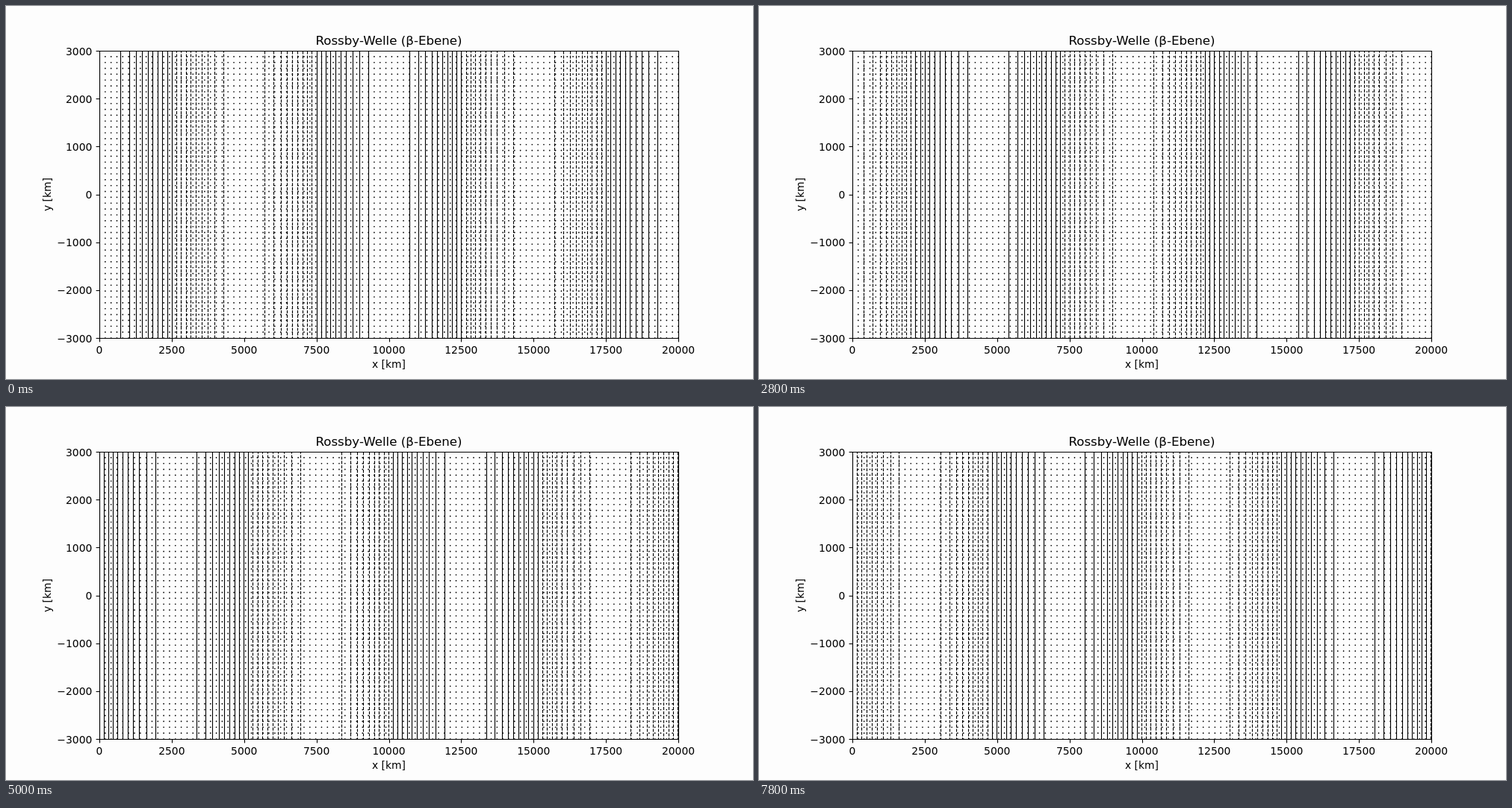
Recreate the animation shown at these times as an HTML page with a canvas. Size 1000 by 500 pixels, loop 8 s.

```html
<!DOCTYPE html>
<html lang="de">
<head>
<meta charset="utf-8">
<title>Rossby-Welle</title>
<style>
  html, body { margin: 0; width: 100%; height: 100%; overflow: hidden; background: #fdfdfd; }
  canvas, svg { position: absolute; left: 0; top: 0; width: 1000px; height: 500px; }
  text { font: 13.889px "DejaVu Sans", sans-serif; text-anchor: middle; }
  .title { font-size: 16.667px; }
  .right { text-anchor: end; }
  path { fill: none; stroke: #000; stroke-width: 1.111; }
</style>
</head>
<body>
<canvas id="plot" width="1000" height="500"></canvas>
<svg id="axes" viewBox="0 0 1000 500">
  <text class="title" x="512.5" y="51.7">Rossby-Welle (β-Ebene)</text>
  <text x="512.5" y="485.3">x [km]</text>
  <text transform="translate(60 252.5) rotate(-90)">y [km]</text>
  <path d="M125.5 60.5H900.5V445.5H125.5Z"/>
</svg>
<script>
const box = { x: 125, y: 60, w: 775, h: 385 };
const nx = 100, ny = 50;
const dx = box.w / (nx - 1), dy = box.h / (ny - 1);

// Physics: phase speed beta / k^2 (westward), one step every six hours
const length = 1e7, domain = 2e7;
const k = 2 * Math.PI / length;
const speed = 2e-11 / (k * k);
const stepSeconds = 6 * 3600, stepMs = 200, steps = 40;

const ctx = document.getElementById('plot').getContext('2d');
const axes = document.getElementById('axes');
const snap = v => Math.floor(v + 0.5) + 0.5;

function add(tag, attrs, text = '') {
  const el = document.createElementNS('http://www.w3.org/2000/svg', tag);
  for (const name in attrs) el.setAttribute(name, attrs[name]);
  el.textContent = text;
  axes.append(el);
}

function drawTicks() {
  for (let i = 0; i <= 8; i++) {
    const x = box.x + box.w * i / 8;
    add('path', { d: `M${snap(x)} 445.5v4.9` });
    add('text', { x, y: 466 }, i * 2500);
  }
  for (let i = -3; i <= 3; i++) {
    const y = box.y + box.h * (3 - i) / 6;
    add('path', { d: `M125.5 ${snap(y)}h-4.9` });
    add('text', { x: 115.3, y: y + 5.6, class: 'right' }, String(i * 1000).replace('-', '\u2212'));
  }
}

// Velocity arrows too short to show: small hexagons on the grid
function makeDots() {
  const path = new Path2D(), r = 0.93;
  for (let i = 0; i < nx; i++) {
    for (let j = 0; j < ny; j++) {
      const x = box.x + i * dx, y = box.y + j * dy;
      path.moveTo(x + r, y);
      for (let a = 1; a < 6; a++) {
        path.lineTo(x + r * Math.cos(a * Math.PI / 3), y + r * Math.sin(a * Math.PI / 3));
      }
      path.closePath();
    }
  }
  return path;
}

function drawContour(x, level, rising) {
  const top = box.y + 0.5, bottom = top + box.h;
  ctx.setLineDash(level < 0 ? [4.111, 1.778] : []);
  ctx.beginPath();
  ctx.moveTo(x, rising ? top : bottom);
  ctx.lineTo(x, rising ? bottom : top);
  ctx.stroke();
}

function draw(step) {
  const shift = speed * stepSeconds * step;
  const psi = i => Math.cos(k * (domain * i / (nx - 1) + shift));
  ctx.clearRect(0, 0, 1000, 500);
  ctx.fill(dots);
  for (let i = 0; i < nx - 1; i++) {
    const a = psi(i), b = psi(i + 1);
    for (let n = -9; n <= 9; n++) {
      const z = n / 10;
      if ((a > z) !== (b > z)) {
        drawContour(snap(box.x + (i + (z - a) / (b - a)) * dx), n, b > a);
      }
    }
  }
}

const dots = makeDots();
let shown = -1;

function tick() {
  const step = Math.floor(performance.now() / stepMs) % steps;
  if (step !== shown) draw(shown = step);
  requestAnimationFrame(tick);
}

ctx.lineWidth = 1.111;
ctx.beginPath();
ctx.rect(box.x, box.y, box.w + 1, box.h + 1);
ctx.clip();
drawTicks();
tick();
</script>
</body>
</html>
```
